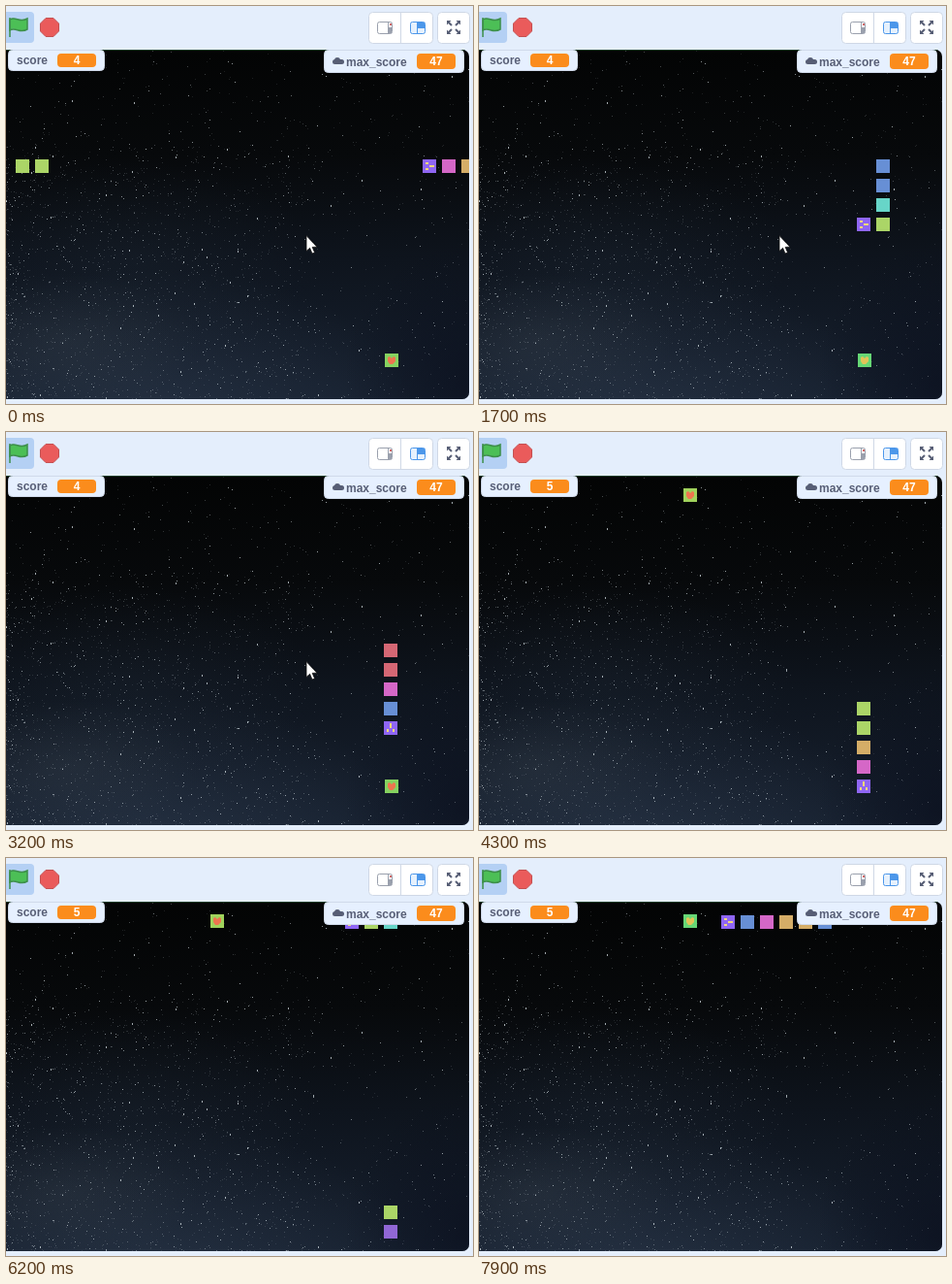
Recreate the animation shown at these times as an HTML page with a canvas. Size 482x410 px, loop 8000 ms.

```html
<!DOCTYPE html>
<html lang="en">
<head>
<meta charset="utf-8">
<title>Snake in space</title>
<style>
html, body { margin: 0; width: 100%; height: 100%; overflow: hidden; background: #e4eefc; }
canvas { display: block; }
</style>
</head>
<body>
<canvas id="view" width="482" height="410"></canvas>
<script>
const LOOP = 8000, RETRACT_DELAY = 140, HISTORY = 4, EATEN_AT = 12, CURSOR_HIDDEN_AT = 4100;
const STAGE = { x: -8, y: 45, w: 486, h: 360 };
const STEP_TIMES = [-100, 260, 620, 980, 1340, 1690, 2060, 2430, 2820, 3190, 3550, 3890, 4260,
  4600, 4990, 5290, 5670, 6070, 6390, 6740, 7100, 7460, 7830];
const ROUTE = 'LLLL' + 'LDDDL' + 'DDDDDDD' + 'DDD' + 'LLLLLLL';
const HUE_OFFSETS = { 4: [0, 2, 3, 3], 5: [0, 2, 4, 4, 0] };

const view = document.getElementById('view');
const ctx = view.getContext('2d');

// Path of the head, wrapping at the left and bottom edges.
const path = [{ x: 37, y: 165, dir: 'L' }];
for (const dir of ROUTE) {
  let { x, y } = path[path.length - 1];
  if (dir === 'L') x = x < 20 ? 477 : x - 20;
  else y = y > 380 ? 46 : y + 20;
  path.push({ x, y, dir });
}

function rounded(c, x, y, w, h, r, fill, stroke) {
  c.beginPath();
  c.roundRect(x, y, w, h, r);
  if (fill) { c.fillStyle = fill; c.fill(); }
  if (stroke) { c.strokeStyle = stroke; c.lineWidth = 1; c.stroke(); }
}

function polygon(c, points, fill, stroke, width = 1) {
  c.beginPath();
  points.forEach(([x, y]) => c.lineTo(x, y));
  c.closePath();
  c.fillStyle = fill;
  c.fill();
  if (stroke) { c.strokeStyle = stroke; c.lineWidth = width; c.stroke(); }
}

function text(c, string, x, y, color, align = 'left') {
  c.font = 'bold 12px "Liberation Sans", sans-serif';
  c.textAlign = align;
  c.fillStyle = color;
  c.fillText(string, x, y);
}

function randomizer(seed) {
  return () => (seed = seed * 16807 % 2147483647) / 2147483647;
}

function glow(c, x, y, rx, ry, rgb, alpha) {
  c.save();
  c.translate(x, y);
  c.scale(rx, ry);
  const g = c.createRadialGradient(0, 0, 0, 0, 0, 1);
  g.addColorStop(0, `rgba(${rgb},${alpha})`);
  g.addColorStop(1, `rgba(${rgb},0)`);
  c.fillStyle = g;
  c.fillRect(-1, -1, 2, 2);
  c.restore();
}

function clipStage(c) {
  c.beginPath();
  c.roundRect(STAGE.x, STAGE.y, STAGE.w, STAGE.h, 7);
  c.clip();
}

function drawSky(c) {
  const rand = randomizer(4711);
  c.save();
  clipStage(c);
  const g = c.createLinearGradient(0, 45, 0, 405);
  g.addColorStop(0, '#030404');
  g.addColorStop(0.3, '#07090b');
  g.addColorStop(0.6, '#0e141d');
  g.addColorStop(1, '#172130');
  c.fillStyle = g;
  c.fillRect(0, 45, 478, 360);
  glow(c, 150, 420, 270, 150, '54,68,88', 0.4);
  glow(c, 60, 345, 140, 70, '64,74,84', 0.25);
  glow(c, 130, 260, 190, 100, '40,52,66', 0.2);
  glow(c, 478, 390, 130, 150, '8,12,26', 0.6);
  for (let i = 0; i < 2600; i++) {
    const dense = rand() < 0.6;
    const x = dense ? 320 * rand() ** 1.4 : 478 * rand();
    const y = dense ? 405 - 260 * rand() ** 1.2 : 45 + 360 * rand();
    const bright = rand() ** 4;
    c.fillStyle = `rgba(205,215,220,${0.12 + 0.68 * bright})`;
    c.fillRect(Math.floor(x), Math.floor(y), 1, bright > 0.93 ? 2 : 1);
  }
  c.fillStyle = '#1d3a24';
  c.fillRect(0, 45, 474, 1);
  c.restore();
}

function drawControls(c) {
  rounded(c, -4, 6, 33, 32, 4, '#b4d0f4');
  c.beginPath();
  c.moveTo(4, 14);
  c.bezierCurveTo(10, 10, 14, 18, 22, 13);
  c.lineTo(22, 24);
  c.bezierCurveTo(14, 29, 10, 21, 4, 25);
  c.closePath();
  c.fillStyle = '#4cbf56';
  c.fill();
  c.strokeStyle = '#3d8f4a';
  c.lineWidth = 1.5;
  c.stroke();
  c.beginPath();
  c.moveTo(4, 12);
  c.lineTo(4, 32);
  c.stroke();

  const octagon = Array.from({ length: 8 }, (_, i) => {
    const a = (i + 0.5) * Math.PI / 4;
    return [45 + 10.3 * Math.cos(a), 22 + 10.3 * Math.sin(a)];
  });
  polygon(c, octagon, '#ea5b5b', '#c44f50');

  rounded(c, 374.5, 6.5, 66, 32, 4, '#fff', '#cfd8e6');
  rounded(c, 445.5, 6.5, 33, 32, 4, '#fff', '#cfd8e6');
  c.fillStyle = '#cfd8e6';
  c.fillRect(407, 7, 1, 31);

  rounded(c, 383.5, 16.5, 15, 12, 2, '#fff', '#9aa0ad');
  c.fillStyle = '#9aa0ad';
  c.fillRect(394, 17, 1, 11);
  c.fillRect(395, 22, 3, 6);
  c.fillStyle = '#d26a6a';
  c.fillRect(396, 18, 2, 2);

  rounded(c, 417.5, 16.5, 15, 12, 2, '#e6f1fd', '#4c97ea');
  c.fillStyle = '#4c97ea';
  c.fillRect(424, 17, 8, 6);
  c.fillRect(424, 22, 1, 6);

  for (const sx of [-1, 1]) for (const sy of [-1, 1]) {
    const at = (x, y) => [462 + sx * x, 22 + sy * y];
    polygon(c, [at(7, 7), at(2.5, 7), at(7, 2.5)], '#575e75');
    c.beginPath();
    c.moveTo(...at(2, 2));
    c.lineTo(...at(5.5, 5.5));
    c.strokeStyle = '#575e75';
    c.lineWidth = 2;
    c.stroke();
  }
}

const scenery = document.createElement('canvas');
scenery.width = 482;
scenery.height = 410;
const sceneryCtx = scenery.getContext('2d');
drawSky(sceneryCtx);
drawControls(sceneryCtx);

function drawHead({ x, y, dir }) {
  ctx.save();
  ctx.translate(x, y);
  if (dir === 'D') ctx.rotate(-Math.PI / 2);
  ctx.fillStyle = '#8f66f4';
  ctx.fillRect(-7, -7, 14, 14);
  ctx.fillStyle = '#f1d77c';
  ctx.fillRect(0, -1, 5, 2);
  ctx.fillRect(-4, -4, 3, 2);
  ctx.fillRect(-4, 2, 3, 2);
  ctx.restore();
}

function drawSegment({ x, y }, step, index, length) {
  const hue = Math.round(7 + step * 14 / 22) + HUE_OFFSETS[length][index - 1];
  ctx.fillStyle = `hsl(${(hue * 45 + 353) % 360} 57% 62%)`;
  ctx.fillRect(x - 7, y - 7, 14, 14);
}

function drawFood(x, y, step) {
  const ripe = step * 3 % 17 > 12;
  ctx.fillStyle = ripe ? '#66d775' : step < EATEN_AT ? '#86d260' : '#a0d35c';
  ctx.fillRect(x - 7, y - 7, 14, 14);
  const color = ripe ? '#e2c458' : '#ee754f';
  polygon(ctx, [[x - 4, y - 3], [x - 2, y - 4], [x, y - 2], [x + 2, y - 4], [x + 4, y - 3],
    [x + 4, y + 1], [x + 1, y + 4], [x - 2, y + 4], [x - 4, y + 1]], color);
}

function drawMonitor(x, w, h, label, labelX, value, valueX, valueH) {
  rounded(ctx, x + 0.5, 45.5, w - 1, h - 1, 4, '#e6f0ff', '#d0daea');
  text(ctx, label, labelX, h === 22 ? 60 : 62, '#575e75');
  rounded(ctx, valueX, 49, 40, valueH, 4, '#fb8c1c');
  text(ctx, value, valueX + 20, h === 22 ? 60 : 61, '#fff', 'center');
}

function drawCloud() {
  rounded(ctx, 337, 55, 12, 5, 2.5, '#575e75');
  ctx.beginPath();
  ctx.arc(342, 56, 3, 0, 2 * Math.PI);
  ctx.fill();
}

function drawCursor() {
  polygon(ctx, [[310, 236.5], [310, 252.5], [313.6, 249.3], [316, 255], [318.6, 254],
    [316.2, 248.4], [321, 248.2]], '#fff', '#111', 0.8);
}

function draw(time) {
  const step = STEP_TIMES.filter(t => t <= time).length - 1;
  const retracted = time >= STEP_TIMES[step] + RETRACT_DELAY;
  // Once retracted, the body already has the place and colours of the next step.
  const pose = retracted ? step + 1 : step;
  const length = pose > EATEN_AT ? 5 : 4;
  const eaten = step >= EATEN_AT;

  ctx.clearRect(0, 0, 482, 410);
  ctx.drawImage(scenery, 0, 0);
  ctx.save();
  clipStage(ctx);
  if (eaten) drawFood(218, 65, pose);
  else drawFood(398, 365, pose);
  for (let i = length; i >= (retracted ? 2 : 1); i--) {
    drawSegment(path[HISTORY + pose - i], pose, i, length);
  }
  drawHead(path[HISTORY + step]);
  ctx.restore();

  drawMonitor(2, 100, 22, 'score', 11, eaten ? '5' : '4', 53, 14);
  drawMonitor(328, 145, 24, 'max_score', 351, '47', 424, 16);
  drawCloud();
  if (time < CURSOR_HIDDEN_AT) drawCursor();
}

const start = performance.now();
function tick() {
  draw((performance.now() - start) % LOOP);
  requestAnimationFrame(tick);
}
tick();
</script>
</body>
</html>
```
